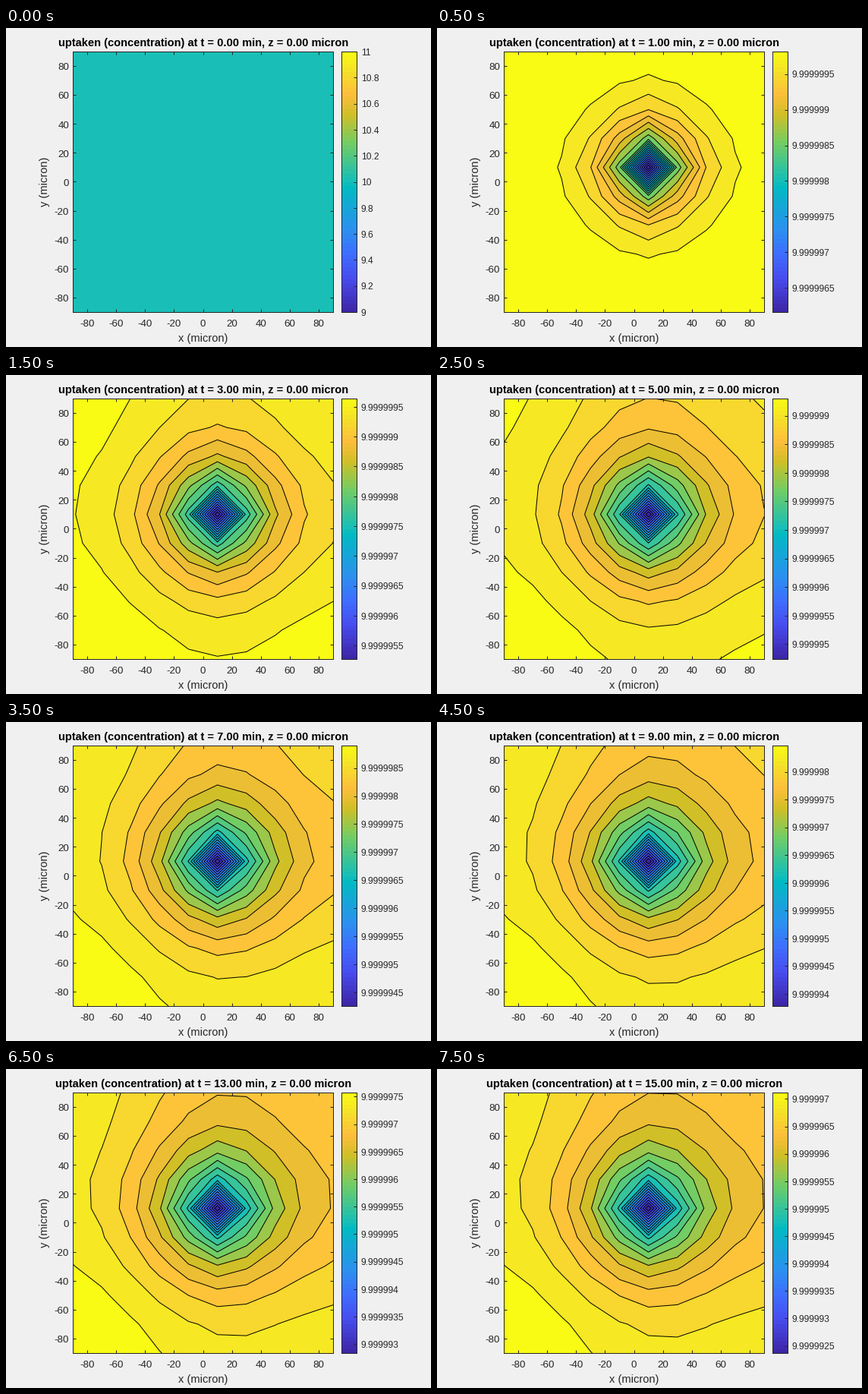
Write a matplotlib script that moves like this. It is 560 px wide and 420 px high and loops after 8 s.

```python
import numpy as np
import matplotlib.pyplot as plt
from matplotlib.animation import FuncAnimation
from matplotlib.colors import LinearSegmentedColormap

W, H, DPI = 560, 420, 80
PX = 72 / DPI                  # points per pixel
LEFT, TOP, SIDE = 88, 31, 343  # plot box in pixels
INK = "#262626"
MINUTES = 16
plt.rcParams["font.family"] = "Liberation Sans"

# Key colours by their place among 64 shades.
STOPS = {0: "#3e26a8", 8: "#484df0", 14: "#3e6fff", 20: "#2b91ef",
         30: "#02bac3", 32: "#19bfb6", 41: "#72cd64", 48: "#d1bf27",
         53: "#febe3c", 59: "#f5e327", 63: "#f9fb15"}
CMAP = LinearSegmentedColormap.from_list(
    "heat", [(i / 63, c) for i, c in STOPS.items()], N=64)

# Diffusion on a closed 10 x 10 grid with one absorbing cell at (10, 10).
N, STEP, D, DT = 10, 20, 1000, 0.01
UPTAKE = 23.38                 # millionths per minute
grid = -90 + STEP * np.arange(N)


def simulate():
    """Concentration change, in millionths, at every full minute."""
    lap = 2 * np.eye(N) - np.eye(N, k=1) - np.eye(N, k=-1)
    lap[0, 0] = lap[-1, -1] = 1
    spread = np.linalg.inv(np.eye(N) + D * DT / STEP**2 * lap)
    z = np.zeros((N, N))
    states = [z]
    for _ in range(1, MINUTES):
        for _ in range(round(1 / DT)):
            z = spread @ z @ spread
            z[5, 5] -= UPTAKE * DT
        states.append(z.copy())
    return states


states = simulate()
fig = plt.figure(figsize=(W / DPI, H / DPI), dpi=DPI, facecolor="#f0f0f0")


def panel(x, y, w, h):
    ax = fig.add_axes([x / W, 1 - (y + h) / H, w / W, h / H])
    ax.tick_params(direction="in", length=4 * PX, width=PX, color=INK,
                   labelbottom=False, labelleft=False)
    ax.set_axisbelow(False)
    for spine in ax.spines.values():
        spine.set(linewidth=PX, color=INK)
    return ax


def label(x, y, text, size, color=INK, ha="center", **kw):
    return fig.text(x / W, 1 - y / H, text, size=size * PX, color=color,
                    ha=ha, va="baseline", **kw)


ax = panel(LEFT, TOP, SIDE, SIDE)
ax.tick_params(top=True, right=True)
ax.set(xlim=(-90, 90), ylim=(-90, 90), facecolor=CMAP(0.5))
ticks = range(-80, 81, 20)
ax.set_xticks(ticks)
ax.set_yticks(ticks)
for v in ticks:
    offset = (v + 90) / 180 * SIDE
    label(LEFT + offset, 393, str(v), 13.33)
    label(83, TOP + SIDE - offset + 5.3, str(v), 13.33, ha="right")

label(259.5, 413, "x (micron)", 14.67)
label(55, 202.5, "y (micron)", 14.67, rotation=90, rotation_mode="anchor")
title = label(260, 24, "", 14.67, color="black", weight="bold")

bar = panel(442, TOP, 20, SIDE)
bar.imshow(np.arange(64)[:, None], cmap=CMAP, extent=(0, 1, 0, 1),
           origin="lower", aspect="auto", interpolation="nearest")
bar.set_xticks([])
bar.tick_params(left=False, right=True)

live = []


def draw_bar(lo, hi, step, unit):
    values = step * np.arange(np.ceil(lo / step), np.floor(hi / step) + 1)
    spots = (values - lo) / (hi - lo)
    bar.set_yticks(spots)
    bar.set_ylim(0, 1)
    for v, s in zip(values, spots):
        y = TOP + SIDE * (1 - s) + 4.8
        live.append(label(468, y, f"{10 + v * unit:.8g}", 12, ha="left"))


def draw(minute):
    while live:
        live.pop().remove()
    title.set_text(f"uptaken (concentration) at t = {minute:.2f} min, "
                   "z = 0.00 micron")
    if minute == 0:
        draw_bar(-1, 1, 0.2, 1)
        return
    z = states[minute]
    levels = np.linspace(z.min(), z.max(), 22)
    fills = CMAP(np.arange(21) / 20)
    live.append(ax.contourf(grid, grid, z, levels, colors=fills))
    live.append(ax.contour(grid, grid, z, levels[1:-1], colors="black",
                           linewidths=PX, linestyles="solid"))
    draw_bar(levels[0], levels[-2], 0.5, 1e-6)


anim = FuncAnimation(fig, draw, frames=MINUTES, interval=500,
                     init_func=lambda: draw(0), repeat=True, repeat_delay=0)
plt.show()
```
